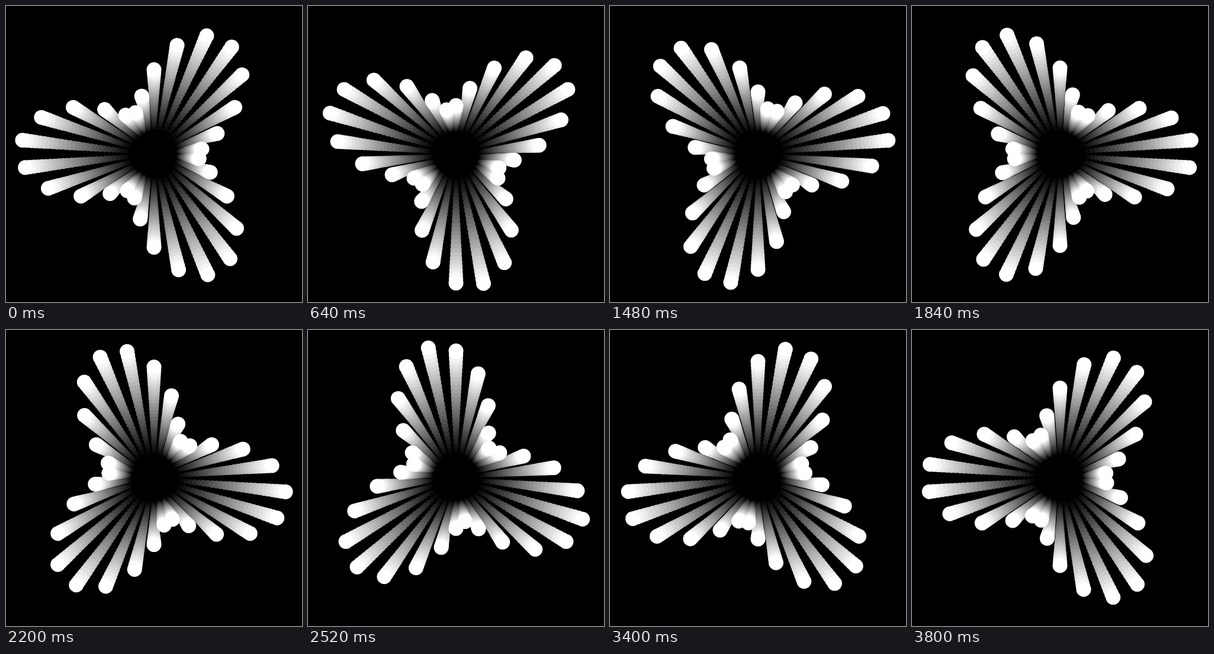
Animation, 500 px wide and 500 px high, one loop 3840 ms. Source, as an HTML page with a canvas:

```html
<!DOCTYPE html>
<html lang="en">
<head>
<meta charset="utf-8">
<title>Radial wave</title>
<style>
html, body { margin: 0; width: 100%; height: 100%; overflow: hidden; background: #000; }
canvas { display: block; width: 500px; height: 500px; }
</style>
</head>
<body>
<canvas id="stage" width="500" height="500"></canvas>
<script>
const ctx = document.getElementById('stage').getContext('2d');
const TAU = Math.PI * 2;
const RAYS = 30, DOTS = 25;
const STEP = 40, STEPS = 96, CYCLE = 97;
const INNER = 40, MEAN = 150, SWING = 75;
const START = 5.8 * Math.PI / 180;

const lerp = (a, b, k) => a + (b - a) * k;

function draw(step) {
  const phase = START + TAU * step / CYCLE;
  ctx.fillStyle = '#000';
  ctx.fillRect(0, 0, 500, 500);

  // Dark inner dots first, so the white tips end up on top
  for (let d = 0; d <= DOTS; d++) {
    const k = d / DOTS;
    const shade = Math.round(255 * k);
    const size = lerp(3.5, 12.5, k);
    ctx.fillStyle = `rgb(${shade},${shade},${shade})`;
    for (let i = 0; i < RAYS; i++) {
      const angle = TAU * i / RAYS;
      const tip = MEAN + SWING * Math.sin(3 * angle - phase);
      const r = lerp(INNER, tip, k);
      ctx.beginPath();
      ctx.arc(250 + r * Math.sin(angle), 250 - r * Math.cos(angle), size, 0, TAU);
      ctx.fill();
    }
  }
}

const begin = performance.now();
let shown = -1;

function tick() {
  const step = Math.floor((performance.now() - begin) / STEP) % STEPS;
  if (step !== shown) draw(shown = step);
  requestAnimationFrame(tick);
}
tick();
</script>
</body>
</html>
```
